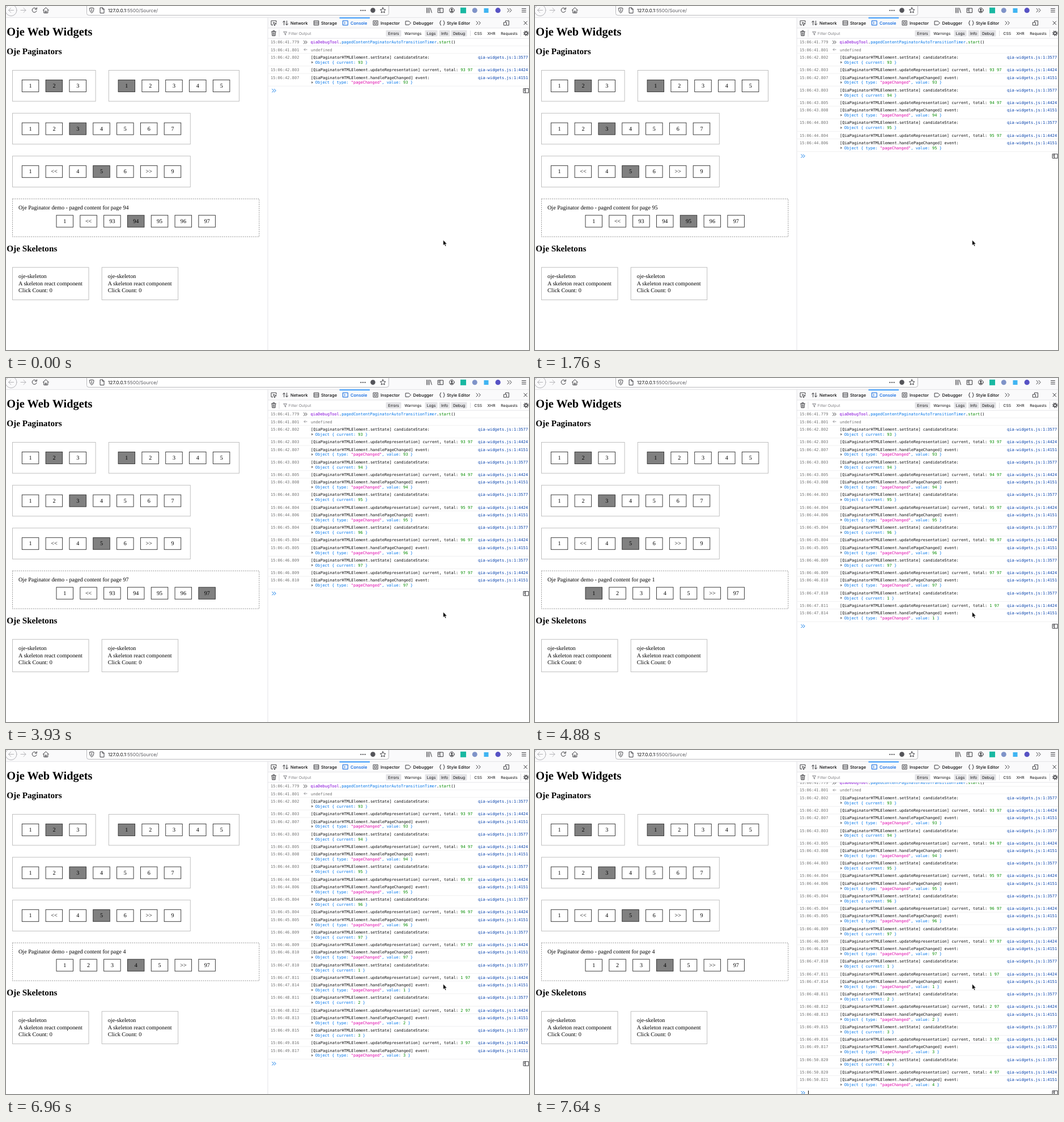
Recreate the animation shown at these times as an HTML page. Size 923 by 607 pixels, loop 8000 ms.

```html
<!DOCTYPE html>
<html lang="en">
<head>
<meta charset="utf-8">
<title>Web widgets</title>
<style>
  html, body { margin: 0; width: 100%; height: 100%; overflow: hidden; background: #fff; }
  svg { display: block; }
  text { white-space: pre; text-rendering: geometricPrecision; }
  .page { font: 10.15px "Liberation Serif", serif; fill: #000; }
  .page .mid { text-anchor: middle; }
  .h1 { font-size: 20.3px; font-weight: bold; }
  .h2 { font-size: 15.2px; font-weight: bold; }
  .box { fill: none; stroke: #b9b9b9; stroke-width: .9; }
  .dash { stroke: #777; stroke-width: .8; stroke-dasharray: 2 1.7; }
  .btn { fill: none; stroke: #2a2a2a; stroke-width: .9; }
  .btn.on { fill: #808080; }
  .ui { font: 500 7.5px Inter, sans-serif; fill: #0c0c0d; }
  .ui .small { font-size: 6.75px; font-weight: 400; }
  .ui .url { font-size: 8.3px; font-weight: 400; }
  .ico { fill: none; stroke: #3c3c40; stroke-width: 1; stroke-linejoin: round; stroke-linecap: round; }
  .pale { stroke: #b4b4b8; }
  .log { font: 6.98px "DejaVu Sans Mono", monospace; fill: #0c0c0d; }
  .dim { fill: #737373; }
  .link { fill: #003eaa; }
  .obj { fill: #0074e8; }
  .num { fill: #058b00; }
  .str { fill: #dd00a9; }
  .var { fill: #8000d7; }
  .line { stroke: #ececee; stroke-width: .8; }
  .blue { stroke: #0074e8; }
</style>
</head>
<body>
<svg width="923" height="607" viewBox="0 0 923 607">
  <defs><clipPath id="view"><rect x="462" y="57.3" width="461" height="549.7"/></clipPath></defs>

  <g class="page" id="page">
    <text class="h1" x="1.3" y="51.6">Oje Web Widgets</text>
    <text class="h2" x="1.3" y="85.3">Oje Paginators</text>
    <text class="h2" x="1.3" y="433.2">Oje Skeletons</text>
    <rect class="box dash" x="11.5" y="340.3" width="435.3" height="66.8"/>
    <text id="caption" x="22" y="359.3"></text>
  </g>

  <g class="ui" id="ui">
    <rect width="923" height="20.4" fill="#fafafb"/>
    <path class="ico" stroke-width=".8" style="stroke:#b9b9bd;fill:#fff" d="M142.5-4V12.5Q142.5 16.3 146 16.3H672Q675.5 16.3 675.5 12.5V-4"/>
    <circle class="ico pale" cx="9" cy="7.5" r="10"/>
    <path class="ico pale" d="M13.5 7.5H4.5M8.5 3.5L4.5 7.5L8.5 11.5M26 7.5H35M31 3.5L35 7.5L31 11.5"/>
    <path class="ico" d="M53.6 5.2A4 4 0 1 0 54 8.5M54.3 2.8V5.8H51.2M65.2 7.5L70.3 2.8L75.4 7.5M66.8 7V12.2H73.8V7M69.3 12V9H71.3V12"/>
    <path class="ico" d="M147.7 4L151.3 3L154.9 4Q155.2 10 151.3 12.4Q147.4 10 147.7 4M151.3 5V10M166.5 3H170.5L173 5.5V12.5H166.5ZM170.3 3.2V5.8H173"/>
    <text class="url" x="180" y="10.9">127.0.0.1<tspan fill="#5c5c61">:5500/Source/</tspan></text>
    <g fill="#3c3c40">
      <circle cx="626.4" cy="7.8" r="1.1"/><circle cx="630" cy="7.8" r="1.1"/><circle cx="633.6" cy="7.8" r="1.1"/>
      <circle cx="647.5" cy="7.6" r="4.3" fill="#55555a"/>
      <circle cx="896.6" cy="30" r="1.1"/><circle cx="900.2" cy="30" r="1.1"/><circle cx="903.8" cy="30" r="1.1"/>
    </g>
    <path class="ico" d="M665.2 2.8L666.7 6L670 6.4L667.6 8.7L668.2 12L665.2 10.4L662.2 12L662.8 8.7L660.4 6.4L663.7 6Z"/>
    <path class="ico" d="M742.5 3.5V12M744.8 3.5V12M747.1 3.5V12M749 3.8L751.3 11.8M762.5 4H771.5V11.7H762.5ZM766 4V11.7M763.7 6H764.8M763.7 8H764.8"/>
    <circle class="ico" cx="786.8" cy="7.6" r="4.3"/>
    <path d="M784 10.4Q784.2 8.2 786.8 8.2Q789.4 8.2 789.6 10.4ZM785.2 6.2a1.6 1.6 0 1 0 3.2 0a1.6 1.6 0 1 0-3.2 0" fill="#3c3c40"/>
    <rect x="802" y="2.8" width="10" height="10" fill="#19b8a2"/>
    <circle cx="827.3" cy="7.7" r="4.5" fill="#7f93c8"/>
    <rect x="843.5" y="4" width="8" height="8" fill="#3fb4f2"/>
    <circle cx="868.2" cy="7.7" r="4.6" fill="#5752c4"/>
    <path class="ico" d="M885 4.3L888 7.6L885 10.9M889 4.3L892 7.6L889 10.9M910.5 4.6H917.5M910.5 7.6H917.5M910.5 10.6H917.5"/>

    <rect x="462" y="20.4" width="461" height="18.4" fill="#fafafb"/>
    <path class="line" style="stroke:#dedee2" d="M0 20.4H923M462.2 38.9H923M462.2 57.1H923M462 20.4V607"/>
    <rect x="588.5" y="20.3" width="53.5" height="1.5" fill="#0a84ff"/>
    <path class="ico" d="M471 33.5H468V26H477V29M472 29L477.3 31.3L475 32L474.3 34.5ZM490.7 33.5V26.5M488.6 28.5L490.7 26.3L492.8 28.5M495.6 26.3V33.5M493.5 31.5L495.6 33.7L497.7 31.5"/>
    <path class="ico" d="M543.8 26H551.8V33.8H543.8ZM543.8 28.6H551.8M543.8 31.2H551.8"/>
    <path class="ico" style="stroke:#0060df" d="M594.7 26H603.3V33.8H594.7ZM596.7 28.3L598.6 30L596.7 31.7"/>
    <path class="ico" d="M648.5 26H656.2V33.8H648.5ZM650.7 28.2H654V31.6H650.7ZM705.5 26.8H711L714.5 30L711 33.2H705.5ZM767.8 26Q766 26 766.4 28Q766.7 30 765.2 30Q766.7 30 766.4 32Q766 34 767.8 34M771.8 26Q773.6 26 773.2 28Q772.9 30 774.4 30Q772.9 30 773.2 32Q773.6 34 771.8 34"/>
    <path class="ico" d="M830 27L833 30L830 33M834.3 27L837.3 30L834.3 33M881.5 28V26H887.5V34H884.5M878.7 29H883.3V34H878.7ZM914 27L919.6 32.8M919.6 27L914 32.8"/>
    <path class="ico" d="M468.5 45.2H476.5M471 45V43.7H474V45M469.3 46L469.9 52.5H475.1L475.7 46M471.6 47V51M473.4 47V51"/>
    <path class="ico" stroke-width=".8" style="stroke:#85858a" d="M490 45.6H495.6L493.6 48.2V51.2L492 50V48.2Z"/>
    <path class="line" style="stroke:#d4d4d8" d="M482 41.5V54.5M819.5 43.5V53M908.5 41.5V54.5"/>
    <circle class="ico" cx="917.8" cy="48.2" r="2.4" style="stroke-width:1.5"/>
    <circle class="ico" cx="917.8" cy="48.2" r="4.1" style="stroke-width:1.4;stroke-dasharray:1.5 1.72;stroke-linecap:butt"/>
    <text class="small" x="498.8" y="50.7" style="fill:#808085">Filter Output</text>
  </g>

  <g clip-path="url(#view)">
    <g class="log" id="log">
      <path class="ico" stroke-width=".9" d="M525.5 61.3L528.1 63.9L525.5 66.5M528.7 61.3L531.3 63.9L528.7 66.5"/>
      <path class="ico" style="stroke:#85858a;stroke-width:.8" d="M531.2 76.9H526M528 74.9L526 76.9L528 78.9"/>
      <text class="dim" x="467" y="66.4">15:06:41.779</text>
      <text class="dim" x="467" y="79.5">15:06:41.801</text>
      <text x="537.6" y="66.4"><tspan class="var">qiaDebugTool</tspan>.<tspan class="obj">pagedContentPaginatorAutoTransitionTimer</tspan>.<tspan class="num">start</tspan>()</text>
      <text class="dim" x="538" y="79.5">undefined</text>
      <path class="line" d="M462.5 70.3H923M462.5 83.6H923"/>
      <g id="prompt">
        <path class="ico blue" d="M469.8 5.2L472.6 8L469.8 10.8M473.3 5.2L476.1 8L473.3 10.8"/>
        <path class="ico" d="M913.5 4.4H922.3V11.8H913.5ZM916.5 4.4V11.8M914.7 6.3H915.4M914.7 8.2H915.4"/>
      </g>
    </g>
    <rect id="caret" x="482" width="1" height="9" fill="#0c0c0d"/>
    <rect id="thumb" x="920" y="65" width="5" height="530" rx="2.5" fill="#000"/>
  </g>

  <path d="M771.6 413V422.4L773.7 420.4L775.2 424L776.8 423.3L775.3 419.9H778.2Z" fill="#000" stroke="#fff" stroke-width=".6"/>
</svg>

<script>
const NS = 'http://www.w3.org/2000/svg';
const LOOP = 8000, PITCH = 41.82, FIRST = 83.6, LINE = 13.32, TALL = 22.2, SET = LINE + 2 * TALL, SCROLL = 6.2;
const $ = id => document.getElementById(id);

function add(parent, tag, attrs, html = '') {
  const el = document.createElementNS(NS, tag);
  for (const key in attrs) el.setAttribute(key, attrs[key]);
  el.innerHTML = html;
  parent.appendChild(el);
  return el;
}
const span = (cls, s) => `<tspan class="${cls}">${s}</tspan>`;

// Page: paginators and cards
function button(x, y, label) {
  return {
    rect: add($('page'), 'rect', { class: 'btn', x, y, width: 29.5, height: 21 }),
    text: add($('page'), 'text', { class: 'mid', x: x + 14.8, y: y + 13.6 }, label)
  };
}
function setButton(b, label, on) {
  b.text.textContent = label;
  b.rect.classList.toggle('on', on);
}
function paginator(x, y, width, labels, current) {
  add($('page'), 'rect', { class: 'box', x, y, width, height: 54.6 });
  labels.split(' ').forEach((s, i) => setButton(button(x + 16.8 + i * PITCH, y + 16.9, s), s, s === current));
}
paginator(11.5, 113.5, 146.6, '1 2 3', '2');
paginator(181.3, 113.5, 230.2, '1 2 3 4 5', '1');
paginator(11.5, 189.2, 313.8, '1 2 3 4 5 6 7', '3');
paginator(11.5, 264.8, 313.8, '1 << 4 5 6 >> 9', '5');
const demo = Array.from({ length: 7 }, (_, i) => button(89 + i * PITCH, 369.2, ''));

for (const x of [11.5, 169.2]) {
  add($('page'), 'rect', { class: 'box', x, y: 461.2, width: 134.5, height: 57.3 });
  ['oje-skeleton', 'A skeleton react component', 'Click Count: 0'].forEach((s, i) =>
    add($('page'), 'text', { x: x + 10.6, y: 480.4 + i * 12.25 }, s));
}

// Developer tools bars
[[502, 'Network'], [556, 'Storage'], [608, 'Console'], [661, 'Inspector'], [718.5, 'Debugger'], [778, 'Style Editor']]
  .forEach(([x, s]) => add($('ui'), 'text', { x, y: 32.7, fill: s === 'Console' ? '#0060df' : '#0c0c0d' }, s));
[[684, 'Errors', 27], [718.3, 'Warnings'], [750.5, 'Logs', 22], [774, 'Info', 19], [799.5, 'Debug', 28],
 [833.3, 'CSS'], [856.5, 'XHR'], [888, 'Requests']].forEach(([x, s, w]) => {
  if (w) add($('ui'), 'rect', { x: x - w / 2, y: 42.8, width: w, height: 11, rx: 1.3, fill: '#e4e4e7' });
  add($('ui'), 'text', { class: 'small', x, y: 50.7, 'text-anchor': 'middle' }, s);
});

// Console messages, three per page change
const values = [93, 94, 95, 96, 97, 1, 2, 3, 4];
const stamps = ['802 803 807', '803 805 808', '803 804 806', '804 804 805', '809 809 810',
                '810 811 814', '811 812 813', '815 816 817', '820 820 821'];

function message(g, top, stamp, text, place, object) {
  const y = top + 9.4;
  add(g, 'text', { class: 'dim', x: 467, y }, stamp);
  add(g, 'text', { x: 538, y }, '[QiaPaginatorHTMLElement.' + text);
  add(g, 'text', { class: 'link', x: 833, y }, 'qia-widgets.js:1:' + place);
  if (object) {
    add(g, 'path', { class: 'dim', d: `M539.2 ${y + 4.3}l3 2.1l-3 2.1z` });
    add(g, 'text', { class: 'obj', x: 545.8, y: y + 8.9 }, `Object { ${object} }`);
  }
  const end = top + (object ? TALL : LINE);
  add(g, 'path', { class: 'line', d: `M462.5 ${end}H923` });
  return end;
}
const sets = values.map((v, k) => {
  const g = add($('log'), 'g', {});
  const at = stamps[k].split(' ').map(ms => `15:06:${42 + k}.${ms}`);
  const n = span('num', v);
  let y = FIRST + k * SET;
  y = message(g, y, at[0], 'setState] candidateState:', 3577, `current: ${n}`);
  y = message(g, y, at[1], `updateRepresentation] current, total: ${n} ${span('num', 97)}`, 4424);
  message(g, y, at[2], 'handlePageChanged] event:', 4151, `type: ${span('str', '"pageChanged"')}, value: ${n}`);
  return g;
});

// Timeline
const pageTimes = [0, 1070, 1990, 3000, 4080, 5030, 6070, 6960];
const logTimes = [0, 140, 1190, 2100, 3150, 4080, 5030, 6070, 7110];
const blinkTimes = [140, 650, 1190, 1760, 2220, 2730, 3270, 3930, 4350, 4880, 5410, 5920, 6450, 6960, 7490];
const passed = (times, t) => times.filter(x => x <= t).length;

function showPage(n) {
  const labels = n > 92 ? [1, '<<', 93, 94, 95, 96, 97] : [1, 2, 3, 4, 5, '>>', 97];
  $('caption').textContent = 'Oje Paginator demo - paged content for page ' + n;
  demo.forEach((b, i) => setButton(b, labels[i], labels[i] === n));
}
function draw(t) {
  const count = passed(logTimes, t);
  const scroll = count === sets.length ? SCROLL : 0;
  const end = FIRST + count * SET;
  showPage(values[passed(pageTimes, t)]);
  sets.forEach((g, k) => g.setAttribute('visibility', k < count ? 'visible' : 'hidden'));
  $('log').setAttribute('transform', `translate(0 ${-scroll})`);
  $('prompt').setAttribute('transform', `translate(0 ${end})`);
  $('caret').setAttribute('y', Math.round(end - scroll + 3.8));
  $('caret').setAttribute('visibility', passed(blinkTimes, t) % 2 ? 'visible' : 'hidden');
  $('thumb').setAttribute('opacity', t < 7110 || t >= 7640 ? 0 : t < 7490 ? .5 : .25);
}
const start = performance.now();
function tick() {
  draw((performance.now() - start) % LOOP);
  requestAnimationFrame(tick);
}
tick();
</script>
</body>
</html>
```
